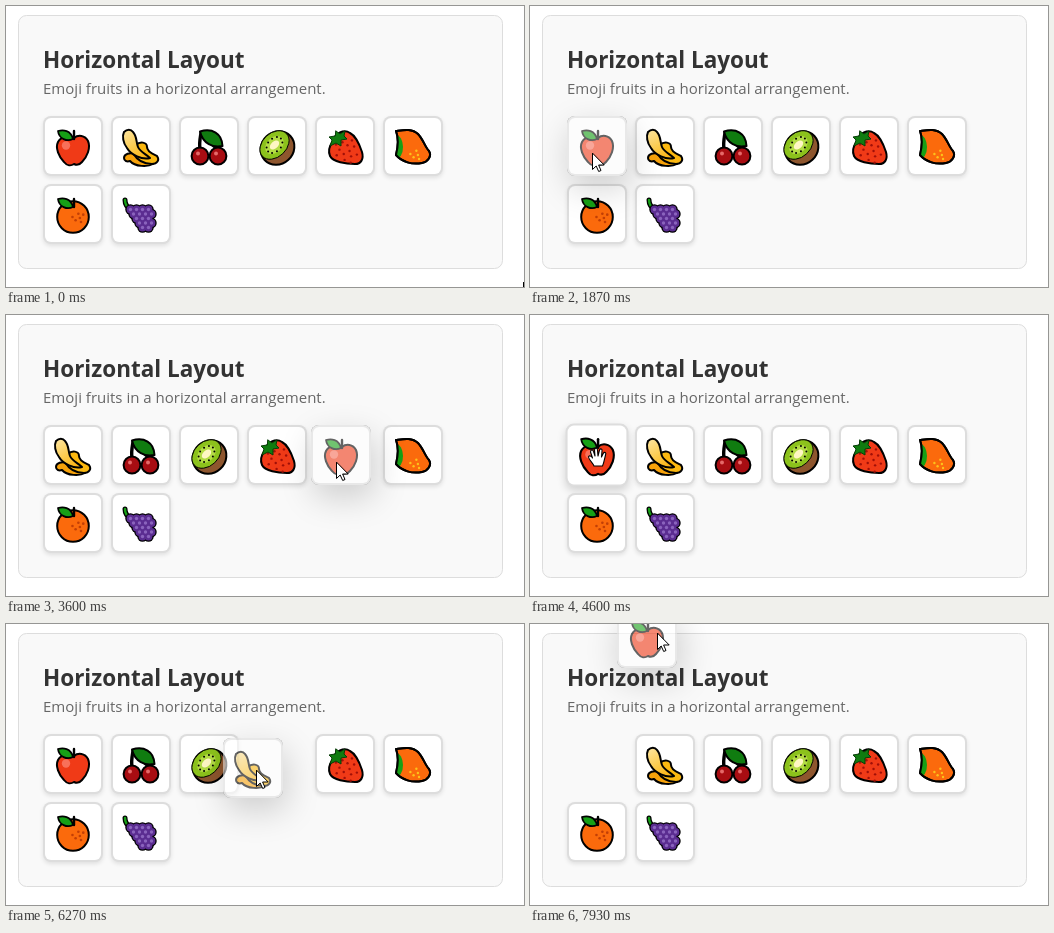
An HTML page with a canvas for the animation above (8 s loop, 518 by 281 pixels).

```html
<!DOCTYPE html>
<html lang="en">
<head>
<meta charset="utf-8">
<title>Horizontal Layout</title>
<style>
html, body { margin: 0; width: 100%; height: 100%; overflow: hidden; background: #fff; }
canvas { display: block; }
</style>
</head>
<body>
<canvas id="stage" width="518" height="281"></canvas>
<script>
const LOOP = 8000, SIZE = 60, STEP = 68, LEFT = 37, TOP = 110, COLS = 6;
const LAG = 40, SLIDE = 170, FADE = 100, OVERLAP = 18;
const stage = document.getElementById('stage');
const ctx = stage.getContext('2d');
const layer = document.createElement('canvas');
layer.width = layer.height = SIZE;
const layerCtx = layer.getContext('2d');

// Pointer gestures: start, end, x, y
const moves = [
  [0, 0, 517, 276], [70, 730, 67, 145], [730, 870, 57, 145], [1070, 1270, 62, 147],
  [1870, 2600, 200, 136], [2600, 3080, 330, 147], [3600, 4330, 67, 142], [4730, 4870, 139, 142],
  [5070, 5500, 284, 142], [5870, 6260, 250, 146], [6300, 6640, 151, 147], [6730, 7000, 63, 142],
  [7400, 7800, 95, 25], [7800, 8050, 155, -5]
];
const drags = [
  { item: 0, start: 1730, end: 4600 },
  { item: 1, start: 5070, end: 6730 },
  { item: 0, start: 7400, end: LOOP + 1 }
];

const clamp = v => Math.max(0, Math.min(1, v));
const smooth = u => u * u * (3 - 2 * u);
const easeOut = u => 1 - (1 - clamp(u)) ** 3;
const lerp = (a, b, u) => a + (b - a) * u;
const place = s => [LEFT + s % COLS * STEP, TOP + Math.floor(s / COLS) * STEP];
const dragAt = t => drags.find(d => t >= d.start && t < d.end);

function pointer(t) {
  let [, , x, y] = moves[0];
  for (const [start, end, toX, toY] of moves.slice(1)) {
    if (t < start) break;
    const u = smooth(clamp((t - start) / (end - start)));
    x = lerp(x, toX, u);
    y = lerp(y, toY, u);
  }
  return [x, y];
}

function draggedAt(d, t) {
  const [px, py] = pointer(d.start), [hx, hy] = place(d.item);
  const [x, y] = pointer(Math.max(d.start, t - LAG));
  return [x - px + hx, y - py + hy];
}

// The gap moves on once the dragged card overlaps its neighbour
for (const d of drags) {
  d.gaps = [];
  let gap = d.item, last = place(gap)[0];
  for (let t = d.start; t < d.end; t += 10) {
    const [x, y] = draggedAt(d, t), old = gap;
    if (Math.abs(y - TOP) < SIZE - OVERLAP) {
      const reach = SIZE - OVERLAP;
      if (x > last && x > place(gap + 1)[0] - reach) gap++;
      if (x < last && gap && x < place(gap - 1)[0] + reach) gap--;
    }
    last = x;
    if (gap !== old) d.gaps.push([t, gap]);
  }
}

function slotOf(i, drag, t) {
  let from = i, to = i, since = -LOOP;
  const at = now => lerp(from, to, easeOut((now - since) / SLIDE));
  for (const [when, gap] of drag ? drag.gaps : []) {
    if (when > t) break;
    const next = i > drag.item && i <= gap ? i - 1 : i;
    if (next !== to) [from, to, since] = [at(when), next, when];
  }
  return at(t);
}

function hovered(i, t) {
  const drag = dragAt(t);
  if (drag) return drag.item === i;
  const [x, y] = pointer(t), [cx, cy] = place(i);
  return x >= cx && x < cx + SIZE && y >= cy && y < cy + SIZE;
}

// Share of the last moments spent under the pointer
function liftOf(i, t) {
  let n = 0;
  for (let k = 0; k < 10; k++) n += hovered(i, t - k * FADE / 10);
  return n / 10;
}

function shape(c, d, fill, width = 2, line = '#000') {
  const p = new Path2D(d);
  c.fillStyle = fill;
  c.fill(p);
  c.lineWidth = width;
  c.lineJoin = c.lineCap = 'round';
  c.strokeStyle = line;
  c.stroke(p);
}

function oval(c, x, y, rx, ry, fill, width = 0, turn = 0) {
  c.beginPath();
  c.ellipse(x, y, rx, ry, turn, 0, 7);
  c.fillStyle = fill;
  c.fill();
  if (!width) return;
  c.lineWidth = width;
  c.strokeStyle = '#000';
  c.stroke();
}

// Evenly spread dots on a sunflower spiral
function scatter(c, n, x, y, spread, r, fill) {
  for (let k = 0; k < n; k++) {
    const d = spread * Math.sqrt((k + .5) / n), a = k * 2.4;
    oval(c, x + d * Math.cos(a), y + d * Math.sin(a), r, r, fill);
  }
}

function leaf(c) {
  shape(c, 'M31 15V23', 'transparent', 2.4);
  shape(c, 'M15 15C20 13.5 28 14 30 23C24 26 16 23 15 15Z', '#16a016', 1.8);
}

const fruits = [
  function apple(c) {
    shape(c, 'M31 22C35 18.5 42 19 45 25C48 32 44 41 39 46C36 49.5 33 49 31 48C28 50 24 50 21 46C16 41 12 32 15 26C18 20 27 20 31 22Z', '#f03a17');
    oval(c, 23, 29.5, 4.2, 4.2, '#f8705a');
    leaf(c);
  },
  function banana(c) {
    const g = c.createLinearGradient(16, 14, 36, 44);
    g.addColorStop(0, '#fde39a');
    g.addColorStop(.5, '#fccb4c');
    g.addColorStop(1, '#fbaf08');
    shape(c, 'M24 38C19 36 13 38 13 42C13 45 16 46 19 45C24 51 37 51 42 48Z', '#f7a20a');
    shape(c, 'M25 29C29 25 36 26 36 31C36 36 42 38 46 40C49 44 46 48 41 48C32 48 26 44 22 37Z', '#fbb810');
    shape(c, 'M13 16C16 13 20 13 22 16C26 20 25 26 27 31C29 36 35 38 39 42C31 44 20 39 16 32C12 27 11 20 13 16Z', g);
  },
  function cherries(c) {
    shape(c, 'M22 17C21 23 20 27 21 33M22 17C28 26 34 28 38 33', 'transparent', 3.4);
    shape(c, 'M21 15.5C33 12 43 17 43.5 30C34 32 24 28 21 15.5Z', '#107c10');
    for (const x of [21, 39]) {
      oval(c, x, 40, 8.4, 8.4, '#a80d12', 2);
      oval(c, x - 2, 37.5, 2, 2, '#e66a6a');
    }
  },
  function kiwi(c) {
    oval(c, 30.5, 32, 17.6, 16, '#8e562e', 2, -.75);
    oval(c, 27.5, 29, 16.5, 12, '#8cc21c', 1, -.75);
    oval(c, 27.5, 29, 10.5, 7.5, '#b4dc45', 0, -.75);
    oval(c, 27.5, 29, 5.5, 3.5, '#fff7c4', 0, -.75);
    for (let a = 0; a < 6; a += Math.PI / 5) {
      const u = 9 * Math.cos(a), v = 6.5 * Math.sin(a);
      oval(c, 27.5 + (u + v) * .71, 29 + (v - u) * .71, 1, 1, '#000');
    }
  },
  function strawberry(c) {
    shape(c, 'M18 25C20 17 29 13 35 17C41 20 44 27 47 36C49 43 46 48 40 48C31 48 18 46 15 40C13 35 15 29 18 25Z', '#f03a17');
    scatter(c, 13, 32, 35, 13, 1.2, '#a01008');
    shape(c, 'M21 15L25 18L30 15L29 20L32 23L26 24L26 30L21 27L15 30L17 24L14 21L20 20Z', '#107c10', 1, '#073d07');
  },
  function mango(c) {
    const body = 'M13 15C20 14 29 12 35 18C40 23 42 31 46 35C49 40 45 46 39 47C29 49 19 46 13 39C15 31 16 23 13 15Z';
    shape(c, body, '#fb6a0c');
    c.save();
    c.clip(new Path2D(body));
    oval(c, 13, 31, 7, 12, '#16a016');
    c.restore();
    scatter(c, 5, 33, 39, 6, 1.2, '#fcc21b');
    shape(c, body, 'transparent');
  },
  function orange(c) {
    oval(c, 30, 33, 15.8, 15.8, '#fb6a0c', 2);
    scatter(c, 6, 35, 34, 6.5, 1.3, '#c23f06');
    leaf(c);
  },
  function grapes(c) {
    shape(c, 'M20 26C17 24 14 21 14 16', 'transparent', 5);
    shape(c, 'M20 26C17 24 14 21 14 16', 'transparent', 2.4, '#16a016');
    for (const [r, fill] of [[5.2, '#000'], [3.9, '#5b2d91'], [1.7, '#8a63bd']])
      for (let row = 0; row < 5; row++)
        for (let k = 0; k < 4 - Math.floor(row / 2); k++)
          oval(c, 19.5 + 6 * k + 3 * row, 25.5 + 4.5 * row, r, r, fill);
  }
];

function box(c, x, y, w, h, r, fill) {
  c.beginPath();
  c.roundRect(x, y, w, h, r);
  c.fillStyle = fill;
  c.fill();
}

function shadow(c, x, y, blur, alpha) {
  c.shadowColor = `rgba(0,0,0,${alpha})`;
  c.shadowOffsetX = x;
  c.shadowOffsetY = y;
  c.shadowBlur = blur;
}

function drawCard(c, i, x, y, lift, cast = true) {
  c.save();
  c.translate(x + SIZE / 2, y + SIZE / 2);
  c.scale(1 + .05 * lift, 1 + .05 * lift);
  c.translate(-SIZE / 2, -SIZE / 2);
  c.save();
  if (cast) shadow(c, 0, 2 + 2 * lift, 4 + 4 * lift, .1 + .06 * lift);
  box(c, 0, 0, SIZE, SIZE, 8, '#ddd');
  c.restore();
  box(c, 2, 2, SIZE - 4, SIZE - 4, 6, '#fff');
  fruits[i](c);
  c.restore();
}

function drawDragged(i, x, y) {
  ctx.save();
  ctx.globalAlpha = .6;
  ctx.save();
  ctx.beginPath();
  ctx.rect(0, 0, stage.width, stage.height);
  ctx.roundRect(x, y, SIZE, SIZE, 8);
  ctx.clip('evenodd');
  shadow(ctx, 3, 12, 34, .3);
  box(ctx, x, y, SIZE, SIZE, 8, '#000');
  ctx.restore();
  layerCtx.clearRect(0, 0, SIZE, SIZE);
  drawCard(layerCtx, i, 0, 0, 0, false);
  ctx.drawImage(layer, x, y);
  ctx.restore();
}

function drawCursor(x, y, hand) {
  ctx.save();
  ctx.translate(x, y);
  if (hand) {
    shape(ctx, 'M-3 9C-4 6 -8 3 -8.5 0C-8 -2 -5.5 -1 -4.5 1L-6.5 -5C-6.5 -7.5 -4 -7.5 -3.5 -5.5L-2 -1L-2.5 -7C-2 -9.5 .5 -9 .5 -7L1 -1L2.5 -7C3.5 -9 5.5 -8 5 -6L4.5 0L6.5 -4C8 -5.5 9.5 -4 8.5 -2C7.5 2 7 6 5.5 9Z', '#fff', 1.1);
  } else {
    shape(ctx, 'M.5 .5V16.5L4.2 13L6.7 18.5L9 17.5L6.6 12H11.8Z', '#fff', 1);
  }
  ctx.restore();
}

function label(text, font, color, y) {
  ctx.font = `${font} "Open Sans", "Noto Sans", sans-serif`;
  ctx.fillStyle = color;
  ctx.fillText(text, LEFT, y);
}

function draw(t) {
  ctx.fillStyle = '#fff';
  ctx.fillRect(0, 0, stage.width, stage.height);
  box(ctx, 12.5, 9.5, 484, 253, 8, '#f9f9f9');
  ctx.lineWidth = 1;
  ctx.strokeStyle = '#ddd';
  ctx.stroke();
  label('Horizontal Layout', 'bold 22.5px', '#333', 62);
  label('Emoji fruits in a horizontal arrangement.', '15px', '#666', 88);

  const drag = dragAt(t);
  fruits.forEach((_, i) => {
    if (drag && drag.item === i) return;
    const [x, y] = place(i), shift = (slotOf(i, drag, t) - i) * STEP;
    drawCard(ctx, i, x + shift, y, liftOf(i, t));
  });
  if (drag) drawDragged(drag.item, ...draggedAt(drag, t).map(Math.round));
  const [x, y] = pointer(t).map(Math.round);
  drawCursor(x, y, !drag && fruits.some((_, i) => hovered(i, t)));
}

// The picture advances at 15 steps per second
function tick() {
  const step = Math.floor((performance.now() % LOOP + 4) * 15 / 1000);
  draw(Math.round(step * 100 / 15) * 10 % LOOP);
  requestAnimationFrame(tick);
}
tick();
</script>
</body>
</html>
```
